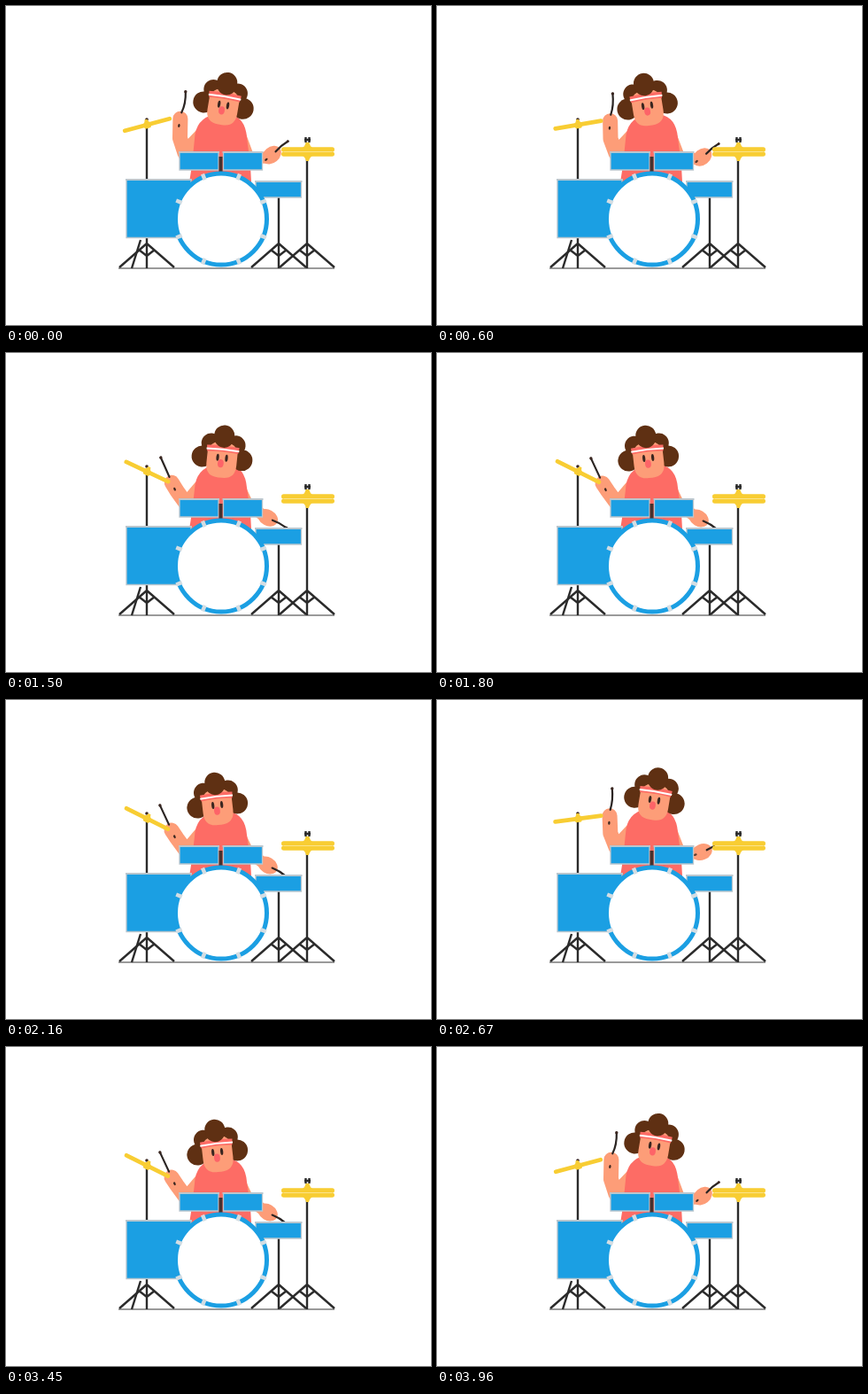
Write an HTML page that moves like this. It is 480 px wide and 360 px high and loops after 3990 ms.

```html
<!DOCTYPE html>
<html lang="en">
<head>
<meta charset="utf-8">
<title>Drummer</title>
<style>
  html, body { margin: 0; width: 100%; height: 100%; overflow: hidden; background: #fff; }
  svg { display: block; width: 100vw; height: 100vh; }
  .skin { fill: #fd9d78; }
  .limb { fill: none; stroke: #fd9d78; stroke-linecap: round; stroke-linejoin: round; }
  .shirt { fill: #fd6c65; }
  .hair { fill: #5f3013; }
  .drum { fill: #1b9fe3; }
  .rim { fill: none; stroke: #b9c6ce; stroke-width: 2; }
  .metal { fill: none; stroke: #2b2b2b; stroke-width: 2.4; stroke-linejoin: round; }
  .stick { fill: none; stroke: #2b2523; stroke-width: 2.2; stroke-linecap: round; }
  .dark { fill: #3a2620; }
  .brass { fill: #f8cd33; }
</style>
</head>
<body>
<svg viewBox="0 0 480 360">
  <path d="M127 296H371" stroke="#9a9a9a" stroke-width="2"/>
  <g id="stands" class="metal"></g>

  <path id="leftArm" class="limb" stroke-width="17"/>
  <path id="rightArm" class="limb" stroke-width="13"/>
  <path id="torso" class="shirt"/>

  <g id="head">
    <g id="curls" class="hair"></g>
    <path class="skin" d="M-17 -10Q-14 -21 -4 -21H4Q14 -21 17 -10V4Q17 19 2 19H-2Q-17 19 -17 4Z"/>
    <path d="M-18 -13Q0 -15 18 -13" fill="none" stroke="#fd6c65" stroke-width="7"/>
    <circle class="hair" cy="-26" r="11"/>
    <path d="M-18.5 -12.5Q0 -14 18.5 -12.5" fill="none" stroke="#fff" stroke-width="2"/>
    <ellipse class="dark" cx="-5" cy="-3.5" rx="1.6" ry="4"/>
    <ellipse class="dark" cx="5" cy="-3.5" rx="1.6" ry="4"/>
    <ellipse cx="-1" cy="3" rx="3.4" ry="4.6" fill="#fd6468"/>
  </g>

  <g id="leftStick">
    <path id="leftShaft" class="stick"/>
    <circle class="dark" cy="-31" r="1.7"/>
    <ellipse class="dark" cy="8" rx="1.2" ry="2"/>
  </g>
  <g id="rightHand">
    <ellipse class="skin" rx="12" ry="9"/>
    <path class="stick" d="M6 0Q15 -1.5 24 0"/>
    <circle class="dark" cx="24" r="1.5"/>
    <ellipse id="buttEnd" class="dark" cx="-8" rx="2" ry="1.2"/>
  </g>

  <circle class="dark" cx="159" cy="128" r="1.8"/>
  <g id="cymbal" class="brass">
    <rect x="-28.5" y="-2.4" width="57" height="4.8" rx="2.4"/>
    <path d="M-6 -1Q-2 -2 -1.5 -6H1.500Q2 -2 6 -1L3 4H-3Z"/>
  </g>

  <path class="metal" d="M338.5 148V154M342.5 148V154M337 151H344"/>
  <g class="brass">
    <rect x="311" y="159.3" width="60" height="5.2" rx="2.6"/>
    <rect x="311" y="164.5" width="60" height="5.2" rx="2.6"/>
    <path d="M333 161Q338 159 338.5 154H342.500Q343 159 348 161V168Q343 170 342 175H339Q338 170 333 168Z"/>
    <path d="M314 164.5H368" stroke="#fbe38a"/>
  </g>

  <g id="drums"></g>
  <rect x="240.5" y="170" width="4" height="18" fill="#46322f"/>
  <circle cx="243" cy="240.5" r="51.5" fill="#fff" stroke="#1b9fe3" stroke-width="5"/>
  <g id="lugs" fill="#d3dde3"></g>
</svg>
<script>
const $ = id => document.getElementById(id);
const TAU = Math.PI * 2;
const mix = (a, b, u) => a + (b - a) * u;

function tripod(x, top, foot = 296) {
  return `<path d="M${x} ${top}V${foot}M${x - 31} 295L${x} 268L${x + 31} 295` +
    `M${x - 9} 275L${x} 282L${x + 9} 275"/>`;
}

function tom(x, y, w, h) {
  return `<rect class="drum" x="${x}" y="${y}" width="${w}" height="${h}"/>` +
    `<path class="rim" d="M${x - 1} ${y - 1}H${x + w + 1}"/>` +
    `<path class="rim" style="stroke-width:1.3" d="M${x} ${y}V${y + h}H${x + w}V${y}"/>`;
}

$('stands').innerHTML = tripod(159, 136) + tripod(308, 216) + tripod(340, 154) +
  '<path d="M152 264L142 296"/>';

$('drums').innerHTML = tom(136, 197, 73, 64.5) + tom(282, 199, 51.5, 17) +
  tom(196, 166, 44, 19) + tom(245.5, 166, 44, 19);

for (let i = 0; i < 8; i++) {
  const a = (i + 0.5) * TAU / 8;
  const x = 243 + 51.5 * Math.cos(a), y = 240.5 + 51.5 * Math.sin(a);
  $('lugs').innerHTML += `<rect x="-3.5" y="-2.2" width="7" height="4.4" ` +
    `transform="translate(${x} ${y}) rotate(${a * 360 / TAU})"/>`;
}

const curls = [[0, -29, 11.5], [0, -14, 16]];
for (const side of [-1, 1]) curls.push([side * 14, -19, 11], [side * 22.5, -3, 12]);
$('curls').innerHTML = curls.map(([x, y, r]) => `<circle cx="${x}" cy="${y}" r="${r}"/>`).join('');

function place(id, x, y, angle) {
  $(id).setAttribute('transform', `translate(${x} ${y}) rotate(${angle})`);
}

const LOOP = 3990, SWAY = 35, BEAT = SWAY / 4;

// Four drawings fill five 30 ms ticks; the first of them is held twice.
function drawingAt(ms) {
  const tick = Math.floor(ms / 30);
  return 4 * Math.floor(tick / 5) + Math.max(0, tick % 5 - 1);
}

function render(ms) {
  const n = drawingAt(ms % LOOP);
  const sway = Math.cos(TAU * n / SWAY);
  const beat = TAU * (n + 0.35) / BEAT;
  const u = Math.min(1, 0.55 * (1 - Math.cos(beat))) ** 1.15;   // 0 raised, 1 struck
  const drag = Math.sin(beat) * (1 - u);

  place('head', 241.5 + 3.5 * sway, 115 + 7 * u, 9.5 * sway);

  const top = 124 + 4 * u;
  $('torso').setAttribute('d', `M207 199L210 180L213 ${top + 26}Q214 ${top + 3} 236 ${top - 2}` +
    `H252Q270 ${top + 1} 272 ${top + 24}L276 180L277 199Z`);

  const lx = 197 - 10 * u, ly = 127 + 20 * u;
  $('leftArm').setAttribute('d', `M${lx} ${ly}L${mix(196.5, 193, u)} ${mix(149, 156, u)}` +
    `L${mix(202, 204, u)} ${mix(166, 171, u)}L220 ${mix(147, 152, u)}`);
  $('leftShaft').setAttribute('d', `M0 -31Q${3 * (1 - u)} -18 0 -7`);
  place('leftStick', lx, ly, 11 - 36 * u + 1.5 * drag);

  const rx = 300 - 4.5 * u, ry = 168 + 18.5 * u;
  $('rightArm').setAttribute('d', `M${mix(264, 262, u)} ${mix(144, 148, u)}` +
    `L${mix(274, 273, u)} 171L${rx - 4} ${ry + mix(3, -2, u)}`);
  place('rightHand', rx, ry, -43 + 74 * u + 9 * drag);
  $('buttEnd').setAttribute('opacity', 1 - u);

  place('cymbal', 159.5, 134, -15.5 + 42 * u);
}

const start = performance.now();
(function loop() {
  render(performance.now() - start);
  requestAnimationFrame(loop);
})();
</script>
</body>
</html>
```
